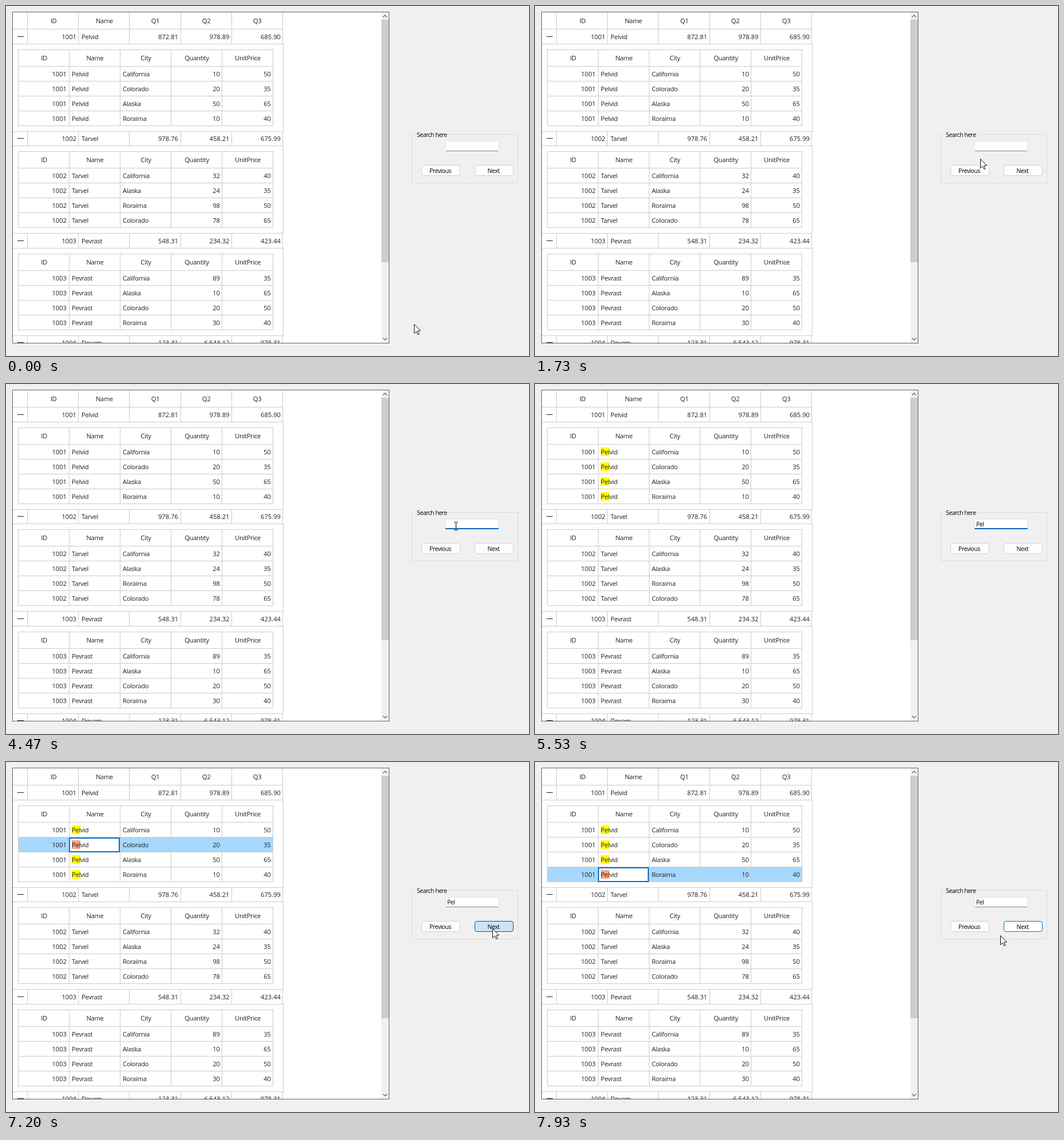
Write an HTML page with a canvas that moves like this. It is 914x612 px and loops after 8000 ms.

```html
<!DOCTYPE html>
<html lang="en">
<head>
<meta charset="utf-8">
<title>Grid search</title>
<style>
html, body { margin: 0; width: 914px; height: 612px; overflow: hidden; background: #f0f0f0; }
canvas { display: block; }
</style>
</head>
<body>
<canvas id="stage" width="914" height="612"></canvas>
<script>
const ctx = document.getElementById('stage').getContext('2d');
const LOOP = 8000, TICK = 200 / 3;
const ROW = 26, COL = 89.2, BLOCK = 178.5;
const GRID = '#cbcbcb', INK = '#202020', ACCENT = '#0078d4';
const GRID_FONT = '11.2px "Open Sans", "Noto Sans", sans-serif';
const FORM_FONT = '10.5px "Open Sans", "Noto Sans", sans-serif';

const people = [
  person('1001 Pelvid 872.81 978.89 685.90',
    'California 10 50, Colorado 20 35, Alaska 50 65, Roraima 10 40'),
  person('1002 Tarvel 978.76 458.21 675.99',
    'California 32 40, Alaska 24 35, Roraima 98 50, Colorado 78 65'),
  person('1003 Pevrast 548.31 234.32 423.44',
    'California 89 35, Alaska 10 65, Colorado 20 50, Roraima 30 40'),
  person('1004 Dovam 123.31 6,543.12 978.31')
];

function person(line, orders) {
  const [id, name, ...sales] = line.split(' ');
  return { id, name, sales, orders: orders && orders.split(', ').map(o => o.split(' ')) };
}

// Pointer moves: start time, end time, goal
const home = [713, 556];
const moves = [
  [5, 270, 689, 503], [805, 1000, 699, 493],
  [1270, 1470, 676, 400], [1470, 1735, 778, 267], [1735, 1935, 787, 248],
  [2940, 3000, 786, 248], [5670, 6130, 850, 291], [7670, 7930, 813, 303]
];
const FOCUS = 3930, TYPING = 4530, MOUSE_BACK = 5730;
const keyTimes = [TYPING, 4870, 5000];
const carets = [[FOCUS, 4470], [TYPING, 5530]];
const presses = [[6330, 6465], [6870, 6930], [7200, 7330], [7600, 7665]];

const countPast = (times, t) => times.filter(v => t >= v).length;
const within = (spans, t) => spans.some(([a, b]) => t >= a && t < b);

function pointerAt(t) {
  let [x, y] = home;
  for (const [t0, t1, gx, gy] of moves) {
    const k = Math.min(1, Math.max(0, (t - t0) / (t1 - t0)));
    x += (gx - x) * k;
    y += (gy - y) * k;
  }
  return [Math.round(x), Math.round(y)];
}

function fill(color, x, y, w, h) {
  ctx.fillStyle = color;
  ctx.fillRect(x, y, w, h);
}
const hline = (x1, x2, y) => fill(GRID, x1, y, x2 - x1 + 1, 1);
const vline = (x, y1, y2) => fill(GRID, x, y1, 1, y2 - y1 + 1);

function columns(x, pitch, y1, y2) {
  for (let i = 0; i < 6; i++) vline(Math.round(x + i * pitch), y1, y2);
}

function text(s, x, y, align = 'left', color = INK) {
  ctx.fillStyle = color;
  ctx.textAlign = align;
  ctx.fillText(s, x, y);
}
function word(s, x, y, align) {
  ctx.letterSpacing = '-0.3px';
  text(s, x, y, align);
}
function number(s, x, y) {
  ctx.letterSpacing = '0px';
  text(s, x, y, 'right');
}
function headings(labels, x, y) {
  labels.split(' ').forEach((s, i) => word(s, x + i * 89, y, 'center'));
}

function personRow(p, top, bottom) {
  const base = top + 17;
  fill(INK, 20, base - 5, 11, 1);
  number(p.id, 123, base);
  word(p.name, 132, base);
  p.sales.forEach((v, i) => number(v, 301 + i * 89.5, base));
  columns(37, COL, top, bottom);
  hline(12, 484, bottom);
}

function orderRow(p, [city, count, price], y, query, selected) {
  if (selected) {
    fill('#a6d8ff', 22, y, 444, 25);
    fill('#fff', 111, y, 88, 25);
  }
  const base = y + 17;
  if (query && p.name.startsWith(query)) {
    ctx.letterSpacing = '-0.3px';
    const w = Math.round(ctx.measureText(query).width);
    fill(selected ? '#ffa07a' : '#ff0', 115, y + 5, w, 15);
  }
  number(p.id, 106, base);
  word(p.name, 115, base);
  word(city, 204, base);
  number(count, 374, base);
  number(price, 463, base);
}

function details(p, d, query, active) {
  const top = 76 + d, rows = top + 30;
  vline(484, 67 + d, 219 + d);
  headings('ID Name City Quantity UnitPrice', 66.5, top + 19);
  p.orders.forEach((o, i) => orderRow(p, o, rows + i * ROW, query, i === active));
  columns(21, 89, top, top + 133);
  hline(21, 467, top);
  for (let i = 0; i < 5; i++) hline(21, 466, rows - 1 + i * ROW);
  if (active >= 0) {
    ctx.strokeStyle = '#0f6fc6';
    ctx.lineWidth = 2;
    ctx.strokeRect(111, rows + 1 + active * ROW, 87, 24);
  }
  hline(12, 484, 219 + d);
}

function chevron(x, y, dir) {
  ctx.strokeStyle = '#606060';
  ctx.lineWidth = 1.2;
  ctx.beginPath();
  ctx.moveTo(x - 3.5, y + 2 * dir);
  ctx.lineTo(x, y - 1.5 * dir);
  ctx.lineTo(x + 3.5, y + 2 * dir);
  ctx.stroke();
}

function grid(query, active) {
  fill('#646464', 11, 10, 659, 580);
  fill('#fff', 12, 11, 657, 578);
  ctx.save();
  ctx.beginPath();
  ctx.rect(12, 11, 644, 578);
  ctx.clip();
  ctx.font = GRID_FONT;
  headings('ID Name Q1 Q2 Q3', 83, 30);
  columns(37, COL, 11, 40);
  hline(12, 483, 40);
  people.forEach((p, i) => {
    const d = Math.floor(BLOCK * i);
    personRow(p, 41 + d, 66 + d);
    if (p.orders) details(p, d, query, i ? -1 : active);
  });
  ctx.restore();
  fill('#f0f0f0', 656, 11, 13, 578);
  fill('#cdcdcd', 656, 24, 13, 424);
  chevron(662.5, 17.5, 1);
  chevron(662.5, 582.5, -1);
}

function button(label, x, [face, edge]) {
  ctx.beginPath();
  ctx.roundRect(x + 0.5, 278.5, 67, 18, 3.5);
  ctx.fillStyle = face;
  ctx.fill();
  ctx.strokeStyle = edge;
  ctx.lineWidth = 1;
  ctx.stroke();
  text(label, x + 33, 292, 'center', '#000');
}

function nextStyle(t, hover) {
  if (within(presses, t)) return ['#cce4f7', '#005499'];
  if (hover) return ['#e0eef9', ACCENT];
  return ['#fdfdfd', t >= presses[0][0] ? ACCENT : '#d0d0d0'];
}

function form(t, query, [px, py]) {
  ctx.strokeStyle = '#dcdcdc';
  ctx.lineWidth = 1;
  ctx.strokeRect(709.5, 224.5, 185, 85);
  fill('#f0f0f0', 716, 223, 57, 3);
  ctx.font = FORM_FONT;
  ctx.letterSpacing = '-0.5px';
  text('Search here', 718, 229, 'left', '#000');

  const focused = t >= FOCUS && t < presses[0][0];
  fill('#e6e6e6', 768, 236, 93, 18);
  fill('#fff', 769, 237, 91, 16);
  if (focused) fill('#0067c0', 768, 252, 93, 2);
  else fill('#868686', 769, 253, 91, 1);
  text(query, 771, 249, 'left', '#000');
  if (within(carets, t)) {
    fill('#000', 771 + Math.round(ctx.measureText(query).width), 239, 1, 12);
  }

  const over = px >= 819 && px < 887 && py >= 278 && py < 297;
  button('Previous', 726, ['#fdfdfd', '#d0d0d0']);
  button('Next', 819, nextStyle(t, over));
}

function beam(x, y) {
  fill('#000', x, y - 6, 1, 13);
  for (const v of [y - 7, y + 7]) {
    fill('#000', x - 3, v, 3, 1);
    fill('#000', x + 1, v, 3, 1);
  }
}

const arrowShape = new Path2D('M.5 .5V16.5L4.2 13.1L6.8 18.5L9.1 17.5L6.7 12.2L11.5 11.9Z');
function arrow(x, y) {
  ctx.save();
  ctx.translate(x, y);
  ctx.fillStyle = '#fff';
  ctx.fill(arrowShape);
  ctx.strokeStyle = '#111';
  ctx.lineWidth = 1;
  ctx.stroke(arrowShape);
  ctx.restore();
}

function draw(now) {
  const t = Math.floor((now % LOOP + 4) / TICK) * TICK + 5;
  const query = 'Pel'.slice(0, countPast(keyTimes, t));
  const active = countPast(presses.map(p => p[1]), t) - 1;
  const pos = pointerAt(t);
  fill('#f0f0f0', 0, 0, 914, 612);
  grid(query, active);
  form(t, query, pos);
  if (t >= TYPING && t < MOUSE_BACK) return;
  const [x, y] = pos;
  const inBox = x >= 768 && x < 861 && y >= 236 && y < 254;
  (inBox ? beam : arrow)(x, y);
}

let start = null;
function loop(now) {
  if (start === null) start = now;
  draw(now - start);
  requestAnimationFrame(loop);
}
requestAnimationFrame(loop);
</script>
</body>
</html>
```
